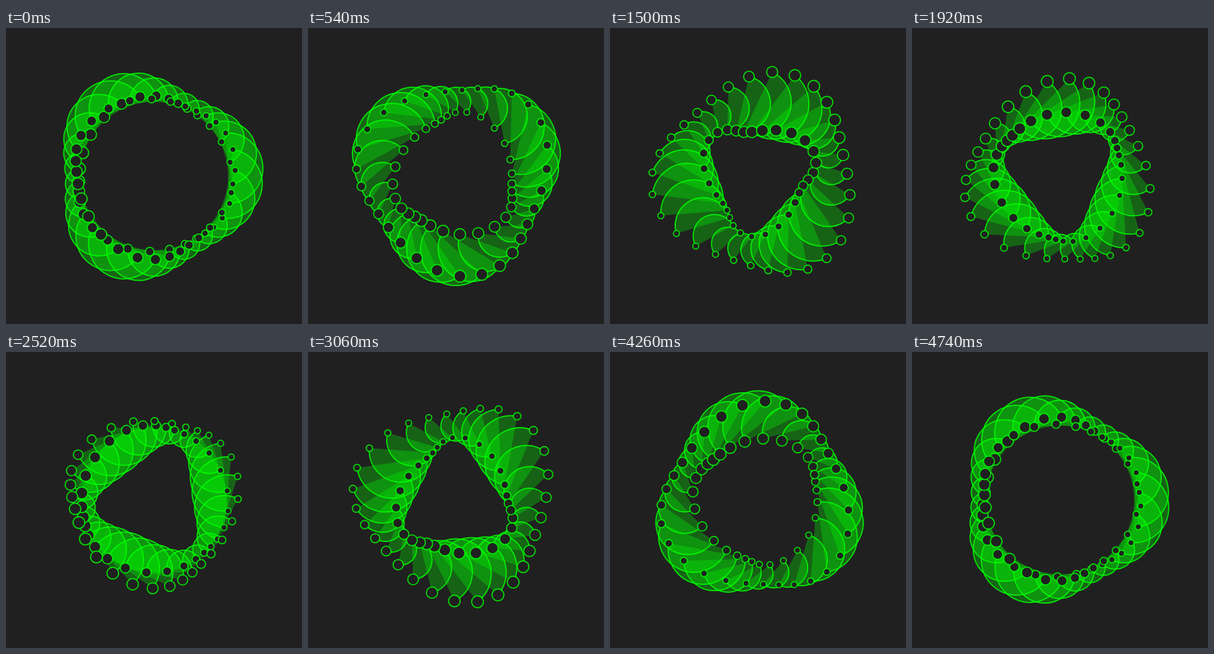
An HTML page with a canvas for the animation above (4.8 s loop, 500x500 px).

```html
<!DOCTYPE html>
<html lang="en">
<head>
<meta charset="utf-8">
<title>Turning arcs</title>
<style>
  html, body { margin: 0; width: 100%; height: 100%; overflow: hidden; background: #202020; }
  canvas { display: block; width: 500px; height: 500px; }
</style>
</head>
<body>
<canvas id="stage" width="500" height="500"></canvas>
<script>
const ctx = document.getElementById('stage').getContext('2d');
const LOOP = 4800, STEP = 60, LEAD = 37;
const COUNT = 30, RING = 125, MID = 250;
const BG = '#202020', GREEN = '#00ff00';

// One arm per ring position: a half disc with a knob at each end.
function arm(i, turn) {
  const a = (i + 0.5) * 2 * Math.PI / COUNT;
  return {
    x: MID + RING * Math.cos(a),
    y: MID + RING * Math.sin(a),
    dir: a + turn - Math.PI / 2,
    size: 42.5 + 17.5 * Math.cos(3 * a + 2 * turn),
    knob: 7.5 - 2.5 * Math.cos(a + 2 * turn)
  };
}

function drawArc({ x, y, dir, size }) {
  ctx.beginPath();
  ctx.arc(x, y, size, dir, dir + Math.PI);
  ctx.fillStyle = 'rgba(0, 255, 0, 0.3)';
  ctx.fill();
  ctx.strokeStyle = 'rgba(0, 255, 0, 0.85)';
  ctx.stroke();
}

function drawKnob({ x, y, dir, size, knob }, side) {
  ctx.beginPath();
  ctx.arc(x + side * size * Math.cos(dir), y + side * size * Math.sin(dir), knob, 0, 2 * Math.PI);
  ctx.fillStyle = BG;
  ctx.fill();
  ctx.strokeStyle = 'rgba(0, 255, 0, 0.8)';
  ctx.stroke();
}

function draw(ms) {
  const t = Math.floor(ms % LOOP / STEP) * STEP + LEAD;
  const turn = 2 * Math.PI * t / LOOP;
  const arms = Array.from({ length: COUNT }, (_, i) => arm(i, turn));
  ctx.fillStyle = BG;
  ctx.fillRect(0, 0, 500, 500);
  ctx.lineWidth = 2;
  arms.forEach(drawArc);
  for (const one of arms) {
    drawKnob(one, -1);
    drawKnob(one, 1);
  }
}

let start;
function tick(now) {
  start ??= now;
  draw(Math.max(0, now - start));
  requestAnimationFrame(tick);
}
draw(0);
requestAnimationFrame(tick);
</script>
</body>
</html>
```
